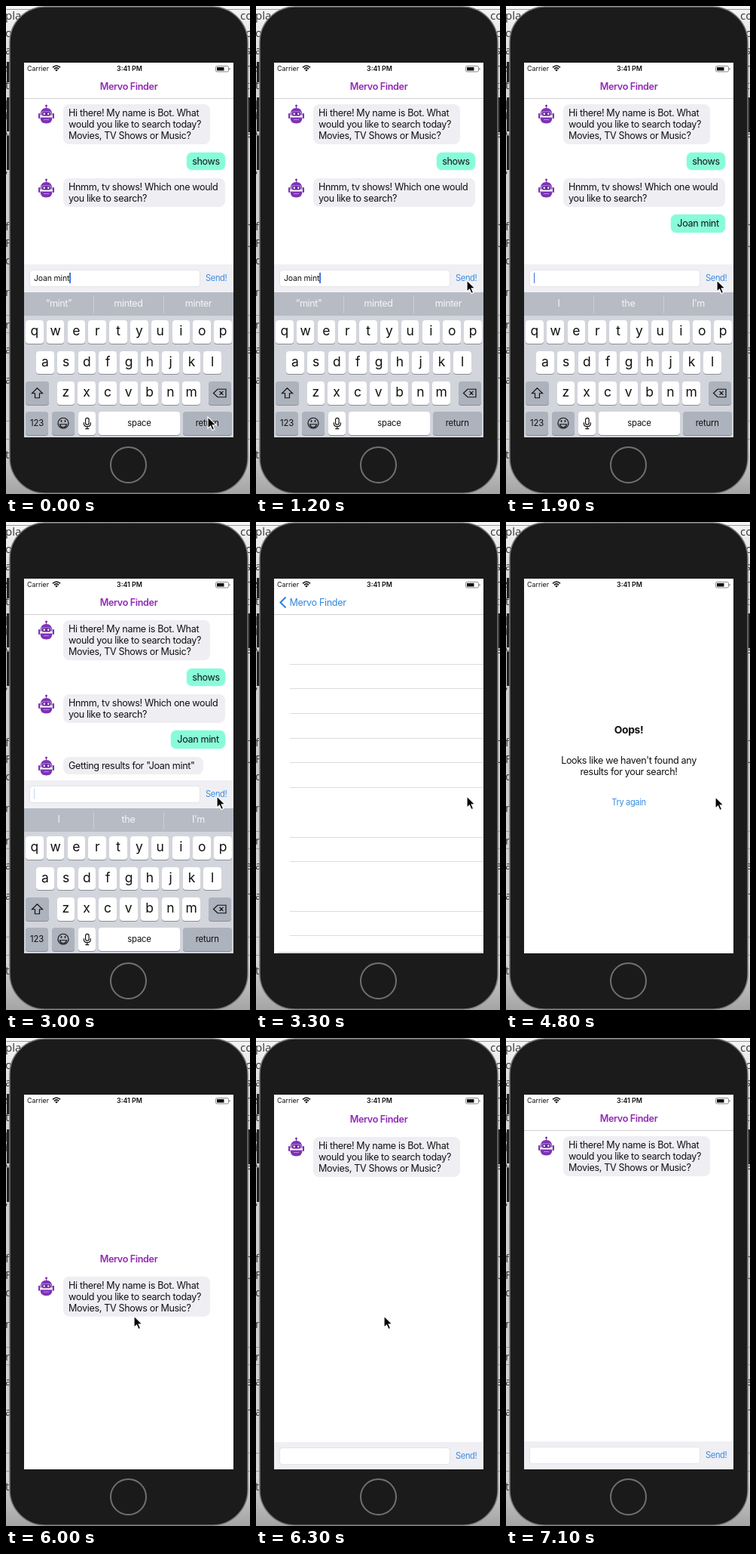
Recreate the animation shown at these times as an HTML page. Size 324x646 px, loop 7.2 s.

```html
<!DOCTYPE html>
<html lang="en">
<head>
<meta charset="utf-8">
<title>Chat search</title>
<style>
html, body { margin: 0; width: 100%; height: 100%; overflow: hidden; background: #eee; }
#stage { position: relative; width: 324px; height: 646px; overflow: hidden;
  font: 12.6px/15px Inter, Roboto, sans-serif; letter-spacing: -.028em; color: #111; }
#stage div, #stage svg { position: absolute; box-sizing: border-box; white-space: nowrap; }
#screen { inset: 0; clip-path: inset(75px 22px 75px 24px); background: #fff; }
.view { inset: 0; background: #fff; }
#chat, #chatNav { z-index: 1; }
#table { z-index: 2; }
#nav { z-index: 3; left: 24px; top: 75px; width: 278px; height: 48px; background: #fff; }
#oops { z-index: 4; text-align: center; }
#status { z-index: 9; left: 24px; top: 75px; width: 278px; height: 16px; font-size: 8.9px; letter-spacing: 0; }
.modal #chat { z-index: 5; }
.modal #nav { z-index: 6; background: none; }
#navLine { left: 0; top: 47px; width: 278px; height: 1px; background: #cfcfd2; }
#title { left: 0; width: 278px; top: 24px; text-align: center; font-weight: 600; color: #9128b4; }
#back { left: 19px; top: 24px; color: #2f86dd; }
#chevron { left: 6px; top: 23px; }
.bubble { padding: 4px 7px; border-radius: 8px; background: #efeef3; }
.user { padding: 4px 0; border-radius: 7px; background: #88fbd9; box-shadow: 0 0 2px #9dfbe0; text-align: center; }
#bar { left: 24px; top: 342px; width: 278px; height: 37px; background: #f0eff4; }
#input { left: 7px; top: 7px; width: 227px; height: 23px; padding: 3px 5px; border: 1px solid #e4e4e8;
  border-radius: 4px; background: #fff; font-size: 10.4px; letter-spacing: -.012em; }
#caret { display: inline-block; width: 1.4px; height: 14px; background: #3f6fe0; vertical-align: -3px; }
#send { left: 241px; top: 11px; font-size: 11.1px; color: #3b8ddd; }
#keys { left: 0; top: 379px; width: 324px; height: 192px; background: #d2d5db; }
#hints { left: 24px; top: 0; width: 278px; height: 31px; background: #b7bbc4; }
.hint { top: 0; height: 31px; line-height: 30px; text-align: center; color: #f4f5f8; }
.sep { top: 4px; width: 1px; height: 24px; background: #cbced5; }
.key { height: 30.5px; border-radius: 4px; background: #fff; box-shadow: 0 1px 0 #8b8e94; text-align: center;
  font-size: 17.5px; line-height: 28px; letter-spacing: 0; }
.key.small { font-size: 11.3px; line-height: 30px; letter-spacing: -.015em; }
.key.grey { background: #adb3bd; }
.key svg { left: 0; top: 0; width: 100%; height: 100%; }
.rule { left: 40px; width: 284px; height: 1px; background: #dcdce0; }
.wide { left: 0; width: 324px; }
.blue { color: #3b8ddd; font-size: 11.1px; }
#pointer { left: 0; top: 0; z-index: 20; }
</style>
</head>
<body>
<div id="stage">
  <svg id="phone" width="324" height="646">
    <defs>
      <linearGradient id="page" x2="0" y2="1">
        <stop offset="0" stop-color="#f6f6f6"/><stop offset=".12" stop-color="#d6d6d6"/>
        <stop offset=".5" stop-color="#cccccc"/><stop offset=".9" stop-color="#d4d4d4"/>
        <stop offset="1" stop-color="#a4a4a4"/>
      </linearGradient>
    </defs>
    <rect width="324" height="646" fill="url(#page)"/>
    <path d="M0 4.500H324M0 409.500H324M0 432.500H324M0 549.500H324M0 573.500H324" stroke="#999"/>
    <g id="words" font-family="Open Sans, sans-serif" font-size="15" fill="#333" letter-spacing="0"></g>
    <path d="M1 74h6v27h-6zM1 121h6v45h-6zM1 172h6v45h-6zM319 121h5v46h-5z" fill="#222"/>
    <rect x="5" y="1" width="316" height="644" rx="47" fill="#1b1b1b" stroke="#777" stroke-width="1.500"/>
    <circle cx="162.500" cy="607.500" r="23.500" fill="#1a1a1a" stroke="#707070" stroke-width="2"/>
  </svg>

  <div id="screen">
    <div id="chat" class="view">
      <div class="bubble" style="left:76px;top:130px;width:195px;height:53px">Hi there! My name is Bot. What<br>would you like to search today?<br>Movies, TV Shows or Music?</div>
      <div id="asked">
        <div class="user" style="left:240px;top:194px;width:51px;height:23px">shows</div>
        <div class="bubble" style="left:76px;top:228px;width:215px;height:38px">Hnmm, tv shows! Which one would<br>you like to search?</div>
      </div>
      <div id="query" class="user" style="left:219px;top:276px;width:72px;height:24px">Joan mint</div>
      <div id="reply"><div class="bubble" style="left:76px;top:311px;width:186px;height:23px">Getting results for "Joan mint"</div></div>
      <div id="bar">
        <div id="input"><span id="typed"></span><span id="caret"></span></div>
        <div id="send">Send!</div>
      </div>
      <div id="keys">
        <div id="hints">
          <div class="hint" style="left:0;width:92px"></div>
          <div class="hint" style="left:92px;width:93px"></div>
          <div class="hint" style="left:185px;width:93px"></div>
          <div class="sep" style="left:92px"></div><div class="sep" style="left:185px"></div>
        </div>
      </div>
    </div>

    <div id="table" class="view"></div>

    <div id="nav">
      <div id="title">Mervo Finder</div>
      <svg id="chevron" width="12" height="17"><path d="M9.500 1.500 2.500 8.500 9.500 15.500" fill="none" stroke="#2f86dd" stroke-width="2.200"/></svg>
      <div id="back">Mervo Finder</div>
      <div id="navLine"></div>
    </div>

    <div id="oops" class="view">
      <div class="wide" style="left:1px;top:268px;font-size:13.8px;font-weight:700">Oops!</div>
      <div class="wide" style="left:1px;top:308px">Looks like we haven't found any<br>results for your search!</div>
      <div class="wide blue" style="left:1px;top:364px">Try again</div>
    </div>

    <div id="status">
      <div style="left:4px;top:0">Carrier</div>
      <div style="left:0;width:280px;top:0;text-align:center;font-weight:600">3:41 PM</div>
      <svg width="278" height="16">
        <g fill="none" stroke="#111" stroke-width="1.600">
          <path d="M38 6.300Q43 1.700 48 6.300M39.900 8.300Q43 5.500 46.100 8.300"/>
        </g>
        <path d="M41.200 9.700Q43 8 44.800 9.700L43 11.600z" fill="#111"/>
        <rect x="254.500" y="4.500" width="17" height="7.500" rx="1.800" fill="none" stroke="#888"/>
        <rect x="256" y="6" width="9.500" height="4.500" fill="#111"/>
        <path d="M273 7v2.600" stroke="#888" stroke-width="1.200"/>
      </svg>
    </div>
  </div>

  <svg id="pointer" width="16" height="22">
    <path d="M1 1V16.200L4.500 12.900 7 18.600 9.700 17.400 7.200 11.900H12z" fill="#000" stroke="#fff" stroke-width="1.200"/>
  </svg>
</div>

<script>
const $ = id => document.getElementById(id);
const add = (parent, html) => parent.insertAdjacentHTML('beforeend', html);
const clamp = x => Math.max(0, Math.min(1, x));

// Page text that shows past the phone's edges
const edges = [
  [0, 'pla:13 o:36 a:59 s:82 t:105 p:128 i:145 v:169 ,:216 fic:292 FR:314 d:337 n:379 re:422 a:455 a:495 to:594'],
  [311, ' co:13'],
  [318, 'c:36 s:59 r:82 t:105 e:169 i:192 m:292 U:314 e:455 n:495 l:594']
];
for (const [x, list] of edges)
  for (const item of list.trim().split(' ')) {
    const [word, y] = item.split(':');
    add($('words'), `<text x="${x - (x ? 0 : 1)}" y="${+y + 5}">${word}</text>`);
  }

const robot = y => `<svg style="left:42px;top:${y}px" width="23" height="27" viewBox="0 0 23 27">
  <g fill="#7d33b4"><circle cx="11.500" cy="2" r="1.500"/><path d="M11 2h1v5h-1z"/>
  <path d="M3.500 14.500C3.500 8 7 5 11.500 5S19.500 8 19.500 14.500z"/>
  <rect x="1" y="12" width="2.200" height="7" rx="1"/><rect x="19.800" y="12" width="2.200" height="7" rx="1"/>
  <path d="M3.500 17.500H19.500Q19.500 25.500 11.500 25.500T3.500 17.500z"/></g>
  <rect x="4.500" y="9.500" width="14" height="6.500" rx="3.200" fill="#c9a3e4"/>
  <rect x="5.500" y="10.300" width="12" height="4.900" rx="2.400" fill="#6a249f"/>
  <circle cx="8.800" cy="12.700" r="1.200" fill="#fff"/><circle cx="14.200" cy="12.700" r="1.200" fill="#fff"/>
  <path d="M8 20.500h7" stroke="#b98bd9"/></svg>`;
add($('chat'), robot(130));
add($('asked'), robot(228));
add($('reply'), robot(310));

// Keyboard
const key = (x, y, w, label, cls = '') =>
  add($('keys'), `<div class="key ${cls}" style="left:${x}px;top:${y}px;width:${w}px">${label}</div>`);
const icon = (w, body) =>
  `<svg viewBox="0 0 ${w} 30" fill="none" stroke="#111" stroke-width="1.200">${body}</svg>`;
[['qwertyuiop', 26, 37], ['asdfghjkl', 40, 77.5], ['zxcvbnm', 67.5, 118]].forEach(([row, x, y]) =>
  [...row].forEach((c, i) => key(x + i * 27.8, y, 23.7, c)));
key(26, 118, 31, icon(31, '<path d="M15.500 8.500 8.500 15.500H12.500V21.500H18.500V15.500H22.500z"/>'), 'grey');
key(269, 118, 30, icon(30, '<path d="M12 10H23V20.500H12L6.500 15.200zM14.500 12.700l5 5m0-5-5 5"/>'), 'grey');
key(26, 158, 30, '123', 'grey small');
key(61, 158, 30, icon(30, '<circle cx="15" cy="15" r="7"/><path d="M10.500 16.500h9q-1 4-4.500 4t-4.500-4z"/><path d="M12.500 11v2.500M17.500 11v2.500" stroke-width="1.600"/>'), 'grey');
key(95.500, 158, 23.700, icon(24, '<rect x="9.700" y="8" width="4.600" height="9" rx="2.300"/><path d="M7.500 14v1.500q0 4 4.500 4t4.500-4V14M12 19.500V22.500M9.500 22.500h5"/>'));
key(123, 158, 108, 'space', 'small');
key(235, 158, 64.500, 'return', 'grey small');

for (const y of [188, 220, 253, 286, 318, 351, 417, 449, 515, 547])
  add($('table'), `<div class="rule" style="top:${y - .5}px"></div>`);
add($('table'), '<div class="rule" style="left:24px;top:569px;height:2px"></div>');

// Timeline, in ms
const LOOP = 7200, SEND = 1500, REPLY = 2100, PUSH = 3015, EMPTY = 3590, RETRY = 5899, SETTLED = 6400;
const path = [[0, 268, 544], [100, 268, 546], [400, 272, 490], [800, 280, 370], [900, 280, 363], [3200, 280, 363],
  [4700, 280, 364], [4800, 278, 364], [5100, 235, 376], [5500, 177, 373], [5600, 170, 368],
  [6400, 170, 368], [6700, 172, 616], [6800, 172, 660], [LOOP, 172, 660]];

function pointerAt(t) {
  const i = path.findIndex(p => p[0] > t);
  const [t0, x0, y0] = path[i - 1], [t1, x1, y1] = path[i];
  const k = (t - t0) / (t1 - t0);
  return [x0 + (x1 - x0) * k, y0 + (y1 - y0) * k];
}

// Critically damped transition from 0 to 1
function spring(t, start) {
  const s = Math.max(0, t - start) * .021;
  return 1 - (1 + s) * Math.exp(-s);
}

const move = (id, x, y) => $(id).style.transform = `translate(${x}px,${y}px)`;
const fade = (id, o) => $(id).style.opacity = o;
const show = (id, on) => $(id).style.display = on ? '' : 'none';

function caretAt(t) {
  const phase = (t < SEND ? t : t - SEND) % 1000;
  return phase < 500 ? 1 : phase < 600 ? .3 : phase < 900 ? 0 : .6;
}

function draw(t) {
  const sent = t >= SEND, fresh = t >= RETRY;
  const push = fresh ? 0 : spring(t, PUSH);
  const rise = fresh ? 496 * (1 - spring(t, RETRY)) : 0;
  const drop = fresh ? 192 : 192 * push;

  $('screen').className = fresh ? 'modal' : '';
  move('chat', -83 * push, rise);
  move('nav', 0, rise);
  move('bar', 0, drop);
  move('keys', 0, drop);
  show('asked', !fresh);
  fade('query', fresh ? 0 : clamp((t - SEND + 100) / 200));
  fade('reply', fresh ? 0 : clamp((t - REPLY + 100) / 200));

  $('typed').textContent = sent ? '' : 'Joan mint';
  fade('caret', fresh || push ? 0 : caretAt(t));
  const words = sent ? ['I', 'the', "I'm"] : ['“mint”', 'minted', 'minter'];
  document.querySelectorAll('.hint').forEach((el, i) => el.textContent = words[i]);

  show('table', push > 0);
  move('table', 278 * (1 - push) + (push < 1 ? 0 : 0), 0);
  move('title', -83 * push, 0);
  fade('title', 1 - push);
  move('back', 83 * (1 - push), 0);
  fade('back', push);
  fade('chevron', push);
  show('navLine', !fresh || t >= SETTLED);

  show('oops', t >= EMPTY);
  move('oops', 0, 496 * (1 - spring(t, EMPTY)));
  const [x, y] = pointerAt(t);
  move('pointer', x - 1, y - 1);
}

const start = performance.now();
function tick() {
  const t = (performance.now() - start) % LOOP;
  draw(Math.floor(t / 100) * 100);
  requestAnimationFrame(tick);
}
tick();
</script>
</body>
</html>
```
